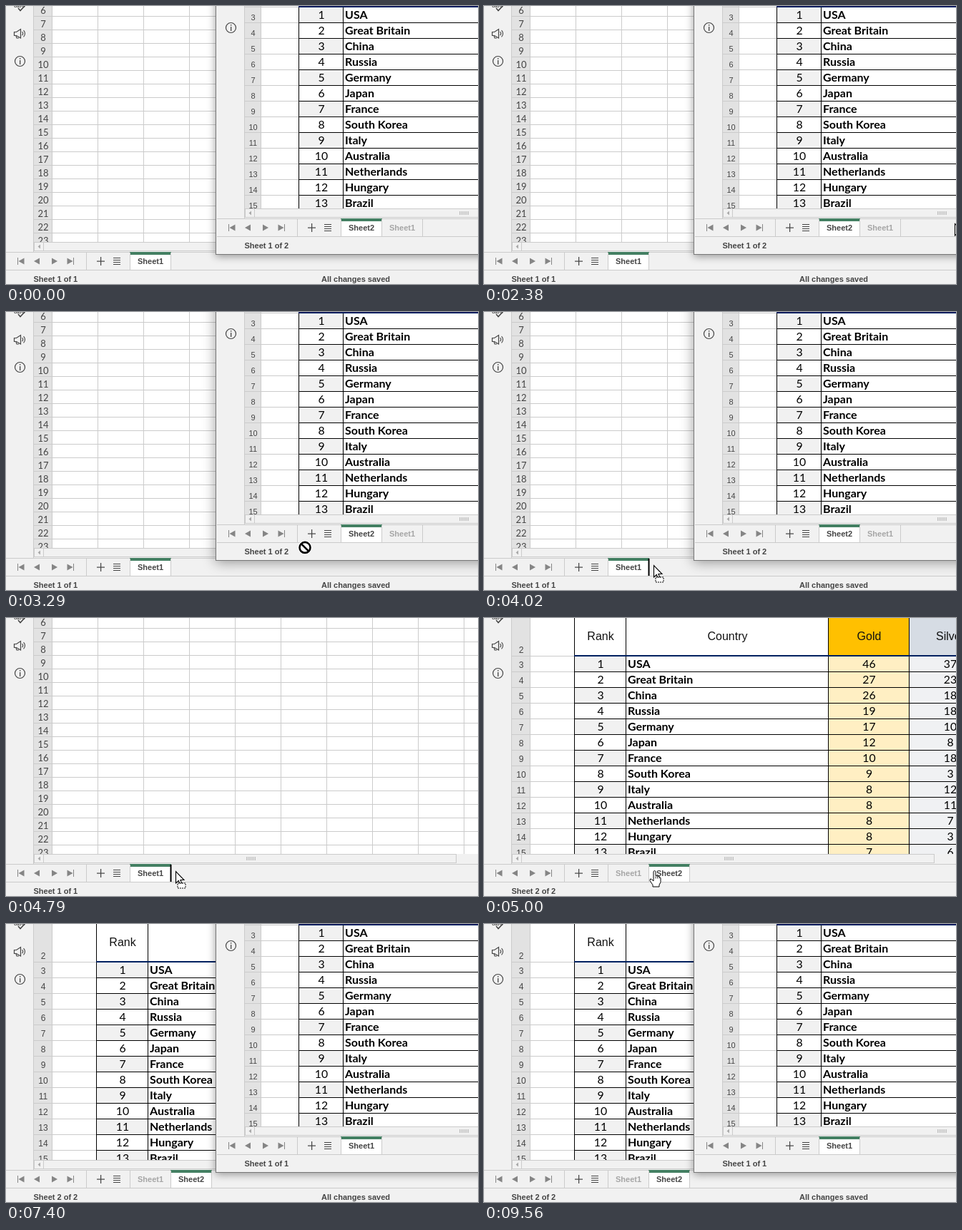
Animation of 660x390 px, one loop 9590 ms. Source, as an HTML page with a canvas:

```html
<!DOCTYPE html>
<html lang="en">
<head>
<meta charset="utf-8">
<title>Moving a sheet between spreadsheets</title>
<style>
html, body { margin: 0; width: 100%; height: 100%; overflow: hidden; background: #fff; }
canvas { display: block; width: 660px; height: 390px; }
</style>
</head>
<body>
<canvas id="stage" width="660" height="390"></canvas>
<script>
const LOOP = 9590;
const ctx = document.getElementById('stage').getContext('2d');

const BAR = '#f1f1f1', LINE = '#cbcbcb', INK = '#444', HEAD = '#e2e2e2', NAVY = '#002060';
const UI = '"Liberation Sans", Arial, sans-serif';
const CELL = 'Lato, sans-serif';

const medals = [
  ['USA', 46, 37], ['Great Britain', 27, 23], ['China', 26, 18], ['Russia', 19, 18],
  ['Germany', 17, 10], ['Japan', 12, 8], ['France', 10, 18], ['South Korea', 9, 3],
  ['Italy', 8, 12], ['Australia', 8, 11], ['Netherlands', 8, 7], ['Hungary', 8, 3],
  ['Brazil', 7, 6]
];

// Table layouts, relative to the window that shows them
const wide = { head: 64, cols: [126, 198, 481, 594, 708], top: 53, label: 12, drop: 0 };
const narrow = { head: 61, cols: [114, 176, 459, 572, 686], top: 48, label: 11, drop: 2 };

function rect(x, y, w, h, color) {
  ctx.fillStyle = color;
  ctx.fillRect(x, y, w, h);
}

function text(s, x, y, font, color, align = 'left') {
  ctx.font = font;
  ctx.fillStyle = color;
  ctx.textAlign = align;
  ctx.fillText(s, x, y);
}

function path(points, fill, stroke, width = 1, close = true) {
  ctx.beginPath();
  points.forEach(([x, y], i) => i ? ctx.lineTo(x, y) : ctx.moveTo(x, y));
  if (close) ctx.closePath();
  if (fill) { ctx.fillStyle = fill; ctx.fill(); }
  if (stroke) { ctx.strokeStyle = stroke; ctx.lineWidth = width; ctx.stroke(); }
}

function circle(x, y, r, stroke, width, fill) {
  ctx.beginPath();
  ctx.arc(x, y, r, 0, 7);
  if (fill) { ctx.fillStyle = fill; ctx.fill(); }
  ctx.strokeStyle = stroke;
  ctx.lineWidth = width;
  ctx.stroke();
}

function at(x, y, draw) {
  ctx.save();
  ctx.translate(x, y);
  draw();
  ctx.restore();
}

function sideIcons() {
  text('abc', 19, 2, '10px ' + UI, INK, 'center');
  path([[17, 3], [20, 6.5], [26, 0]], null, INK, 1.5, false);
  path([[11.5, 36.5], [14.5, 36.5], [20.5, 32.5], [20.5, 45], [14.5, 41.5], [11.5, 41.5]], null, INK, 1.2);
  path([[14, 42], [15, 45], [18, 45]], null, INK, 1.1, false);
  for (const [x, r] of [[20, 3.5], [20, 6.5]]) {
    ctx.beginPath();
    ctx.arc(x, 38.7, r, -0.8, 0.8);
    ctx.strokeStyle = INK;
    ctx.lineWidth = 1.1;
    ctx.stroke();
  }
  circle(19.5, 77.5, 7, INK, 1.2);
  rect(19, 76, 1.3, 6, INK);
  rect(19, 73, 1.3, 1.6, INK);
}

function emptyGrid() {
  rect(39, 0, 26, 331, HEAD);
  for (let y = 15, n = 6; y < 355; y += 19, n++) {
    rect(39, y - 1, 621, 1, LINE);
    text(n, 52, y - 4, '13px ' + CELL, INK, 'center');
  }
  for (let x = 64; x < 660; x += 64) rect(x, 0, 1, 331, LINE);
}

function table(t) {
  const [rank, country, gold, silver, end] = t.cols;
  const mid = (a, b) => (a + b) / 2 + 1;
  const label = t.label + 'px ' + UI;
  const top = t.top;

  rect(39, 0, t.head - 39, 331, HEAD);
  rect(gold, 0, silver - gold, 331, '#ffefc3');
  rect(gold, 0, silver - gold, top, '#ffc000');
  rect(silver, 0, end - silver, 331, '#f0f1f3');
  rect(silver, 0, end - silver, top, '#d6dce4');

  const heads = ['Rank', 'Country', 'Gold', 'Silver'];
  heads.forEach((s, i) => text(s, mid(t.cols[i], t.cols[i + 1]), top - 22, '16px ' + UI, '#111', 'center'));
  text(2, 52, top - 4, label, INK, 'center');
  rect(39, top, rank - 39, 1, LINE);

  medals.forEach(([name, g, s], i) => {
    const y = top + i * 22, base = y + 17;
    if (i % 2 === 0) rect(rank, y + 1, country - rank, 22, BAR);
    const num = (n, a, b) => text(n, mid(a, b), base, '15.8px ' + CELL, '#000', 'center');
    num(i + 1, rank, country);
    text(name, country + 3, base, 'bold 16px ' + CELL, '#000');
    num(g, gold, silver);
    num(s, silver, end);
    text(i + 3, t.head / 2 + 20, base + t.drop, label, INK, 'center');
    rect(39, y + 22, rank - 39, 1, LINE);
    rect(rank, y + 22, end - rank, 1, '#000');
  });

  rect(t.head, 0, 1, 331, LINE);
  for (const x of t.cols) rect(x, 0, 1, 331, '#000');
  rect(rank, top - 1, end - rank, 2, NAVY);
}

function scrollBar(right, grip) {
  rect(39, 331, 621, 14, BAR);
  ctx.strokeStyle = LINE;
  ctx.lineWidth = 1;
  ctx.fillStyle = BAR;
  for (const [x, w] of [[39.5, 13], [52.5, right - 52]]) {
    ctx.fillRect(x, 331.5, w, 12);
    ctx.strokeRect(x, 331.5, w, 12);
  }
  path([[48, 334.5], [44.5, 337.5], [48, 340.5]], '#aaa');
  for (let i = 0; i < 7; i++) rect(grip + i * 2, 335, 1, 5, '#bbb');
}

function navArrow(x, dir, bar) {
  path([[x + 4 * dir, 358], [x - 4 * dir, 353.5], [x - 4 * dir, 362.5]], '#858585');
  if (bar) rect(x + 5 * dir - 0.5, 353, 1, 10, '#858585');
}

function tabBar(tabs, active, status) {
  rect(0, 345, 660, 55, BAR);
  rect(0, 345, 660, 1, LINE);
  rect(0, 370, 660, 1, LINE);
  navArrow(21.5, -1, true);
  navArrow(43, -1);
  navArrow(68, 1);
  navArrow(89.5, 1, true);
  rect(112, 346, 1, 24, LINE);
  rect(127, 357.5, 11, 1.2, INK);
  rect(132, 352, 1.2, 12, INK);
  for (let i = 0; i < 4; i++) rect(150, 353 + i * 3, 10, 1, INK);
  tabs.forEach((name, i) => {
    const x = 173 + i * 57, on = i === active;
    if (on) {
      rect(x, 345, 57, 25, '#fff');
      rect(x, 345, 58, 4, '#437f62');
    }
    rect(x, 346, 1, 24, LINE);
    rect(x + 57, 346, 1, 24, LINE);
    text(name, x + 29, 362, 'bold 11px ' + UI, on ? INK : '#a5a5a5', 'center');
  });
  text(status, 38.5, 387, 'bold 11px ' + UI, INK);
}

function sheetWindow(o) {
  rect(0, 0, 660, 400, '#fff');
  o.table ? table(o.table) : emptyGrid();
  rect(0, 0, 38, 345, BAR);
  rect(38, 0, 1, 345, LINE);
  sideIcons();
  scrollBar(o.right, o.grip);
  tabBar(o.tabs, o.active, o.status);
}

function backWindow(t) {
  const merged = t >= 4820, loaded = t >= 5000;
  sheetWindow({
    table: loaded && wide,
    right: 629, grip: 336,
    tabs: merged ? ['Sheet1', 'Sheet2'] : ['Sheet1'],
    active: merged ? 1 : 0,
    status: loaded ? 'Sheet 2 of 2' : 'Sheet 1 of 1'
  });
  const note = t < 4790 || t >= 6280 ? 'All changes saved' : t >= 5950 ? 'Saving spreadsheet...' : '';
  text(note, 489, 387, 'bold 11px ' + UI, INK, 'center');
}

function frontWindow(t) {
  const moved = t >= 7400;
  ctx.save();
  ctx.shadowColor = 'rgba(0,0,0,.4)';
  ctx.shadowBlur = t >= 2910 && !moved ? 17 : 11;
  ctx.shadowOffsetY = 2;
  rect(293, -30, 400, 379, '#777');
  ctx.restore();
  ctx.save();
  ctx.beginPath();
  ctx.rect(294, 0, 366, 348);
  ctx.clip();
  at(295, -47, () => {
    rect(-1, 0, 1, 400, BAR);
    sheetWindow({
      table: narrow,
      right: 400, grip: 339,
      tabs: moved ? ['Sheet1'] : ['Sheet2', 'Sheet1'],
      active: 0,
      status: moved ? 'Sheet 1 of 1' : 'Sheet 1 of 2'
    });
  });
  ctx.restore();
}

function arrow() {
  path([[0, 0], [0, 16.5], [3.8, 13], [6.3, 18.7], [8.8, 17.6], [6.4, 12], [11.5, 12]], '#fff', '#000', 1.1);
}

function dragArrow() {
  arrow();
  ctx.setLineDash([2, 1]);
  ctx.strokeStyle = '#000';
  ctx.lineWidth = 1;
  rect(3, 17, 11, 7, '#fff');
  ctx.strokeRect(2.5, 16.5, 11, 7);
  ctx.setLineDash([]);
}

function hand() {
  ctx.lineJoin = 'round';
  path([[-2, 1], [-0.5, 0], [1, 1], [1, 7], [4, 7.5], [6, 8.5], [8, 10], [8, 16],
    [6, 20], [6, 22.5], [-3, 22.5], [-3, 20], [-7, 14], [-6.5, 11.5], [-4.5, 12], [-2, 14.5]], '#fff', '#000', 1);
  for (const x of [1, 3.5, 6]) path([[x, 8], [x, 11]], null, '#000', 0.8, false);
}

function noDrop() {
  circle(0, 0, 7.5, '#fff', 5, '#fff');
  circle(0, 0, 7.5, '#000', 2.6);
  path([[-5, -5], [5, 5]], null, '#000', 2.6, false);
}

const smooth = u => u * u * (3 - 2 * u);
const step = (t, start, size, count) => Math.min(Math.floor((t - start) / size), count - 1) / (count - 1);

function dropMark() {
  rect(229.5, 346, 2, 24, '#000');
}

function pointer(t) {
  if (t < 2380 || t >= 6080) return;
  if (t < 2910) {
    const u = step(t, 2380, 30, 14), p = 1 - (1 - u) ** 1.6;
    const x = 658.5 - 159.5 * p;
    at(x, 305.5 + 3 * p, x < 526 ? hand : arrow);
  } else if (t < 4020) {
    const p = smooth(step(t, 2910, 30, 32) ** 1.05);
    const x = 498 - 259.5 * p, y = 309 + 46 * p ** 0.65;
    const over = x < 262;
    if (over) dropMark();
    at(x, y, over || y < 323 ? dragArrow : noDrop);
  } else if (t < 4820) {
    dropMark();
    at(237.5, 355.5, dragArrow);
  } else if (t < 5820) {
    at(239, 354.5, t < 4850 ? arrow : hand);
  } else {
    const p = (Math.floor((t - 5820) / 37) + 1) / 8;
    at(239 + 333 * p, 354.5 + 37 * p, p < 0.14 ? hand : arrow);
  }
}

function tooltip() {
  rect(246, 370, 53, 20, '#767676');
  rect(247, 371, 51, 18, '#fff');
  text('Sheet2', 272.5, 384, '12px "Open Sans", sans-serif', '#575757', 'center');
}

function frame(now) {
  const t = now % LOOP;
  backWindow(t);
  if (t < 4790 || t >= 7400) frontWindow(t);
  if (t >= 5530 && t < 5820) tooltip();
  pointer(t);
}

let start;
function tick(now) {
  start ??= now;
  frame(Math.max(0, now - start));
  requestAnimationFrame(tick);
}
frame(0);
requestAnimationFrame(tick);
</script>
</body>
</html>
```
